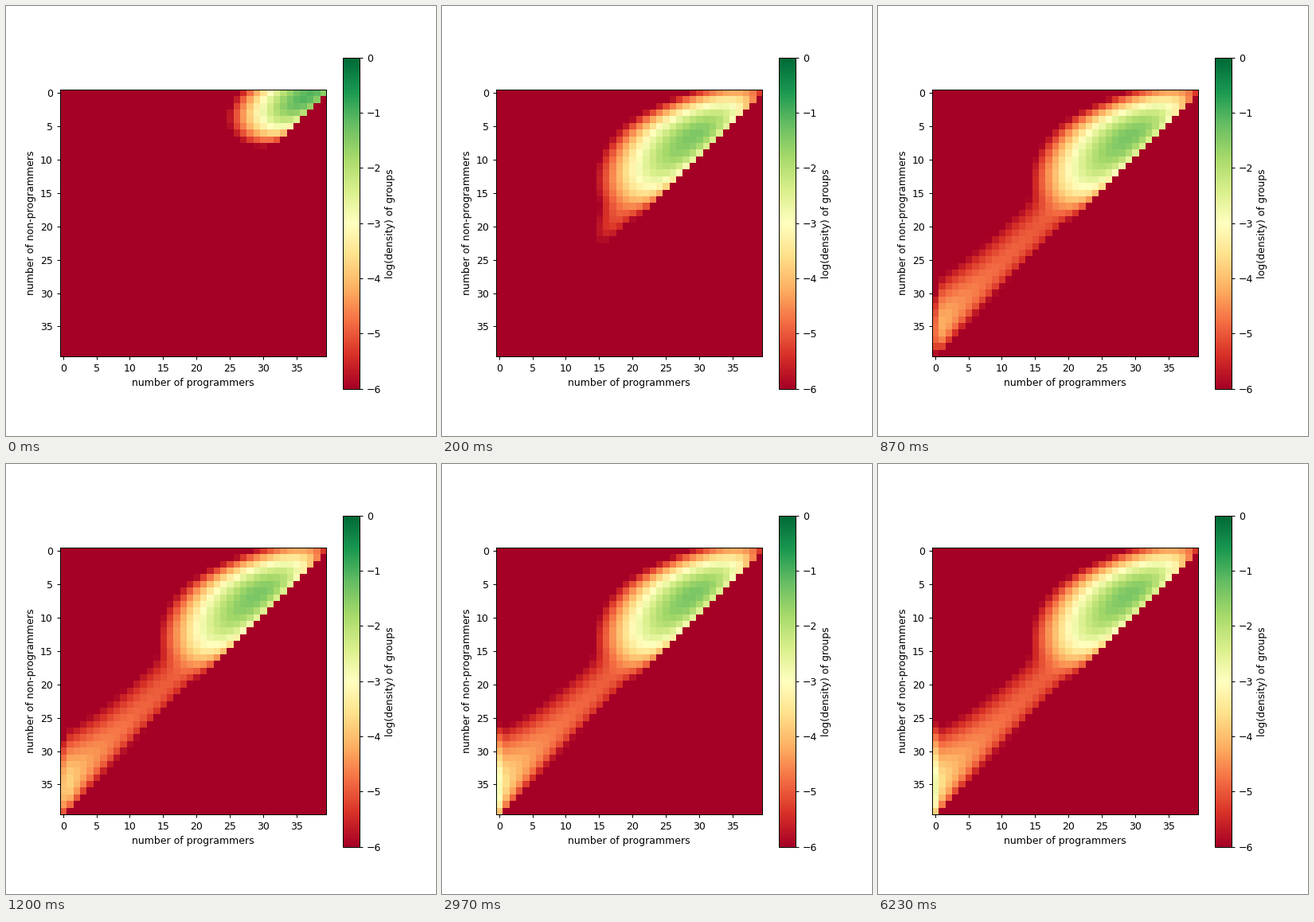
A matplotlib script that plays this animation: 540x540 px, repeating every 8 s.

```python
import numpy as np
import matplotlib.pyplot as plt
from matplotlib.animation import FuncAnimation

SIZE = 40
FRAMES, INTERVAL = 250, 32
STEPS_PER_SECOND = 30

plt.rcParams["font.family"] = "DejaVu Sans"
plt.rcParams["font.size"] = 10

y, x = np.mgrid[:SIZE, :SIZE]
vacancy = SIZE - 1 - x - y
allowed = vacancy >= 0
vacancy = np.clip(vacancy, 0, None)
index = np.arange(SIZE)
LOG_FACT = np.concatenate([[0], np.cumsum(np.log10(index[1:]))])


def poisson_drop(mean):
    """Log10 of a Poisson law of the vacancies, relative to its mode."""
    mode = np.floor(mean).astype(int)
    return (vacancy - mode) * np.log10(mean) - LOG_FACT[vacancy] + LOG_FACT[mode]


def cluster(step):
    """Main cluster: its ridge drifts from the top corner to its rest place."""
    settled = 1 - np.exp(-0.8 * step)
    start_ridge = -1.05 - 0.088 * (index - 0.5) ** 2
    offset = index - 6.5
    rest_ridge = -1.4 - np.where(offset < 0, 0.068, 0.028) * offset ** 2
    start_mean = np.maximum(2.5 - 0.08 * index, 1)
    rest_mean = np.maximum(4.2 - 0.0065 * index ** 2, 1)
    ridge = start_ridge + settled * (rest_ridge - start_ridge)
    mean = start_mean + settled * (rest_mean - start_mean)
    return ridge[:, None] + poisson_drop(mean[:, None])


def tail(step):
    """Stream of groups losing programmers, piling up where none are left."""
    front = 34 * np.exp(-step / 10)
    filled = 1 - np.exp(-(step / 24) ** 2)
    ridge = -5.05 + 1.7 * filled * np.exp(-index / 5.5)
    ridge[0] = -2.72 + np.log10(step ** 4 / (step ** 4 + 70 ** 4) + 1e-9)
    ridge -= 0.05 * np.maximum(front - index, 0) ** 2
    return ridge + poisson_drop(np.float64(4))


def log_density(step):
    total = np.log10(10 ** cluster(step) + 10 ** tail(step) + 1e-12)
    return np.where(allowed, total, -12)


fig, ax = plt.subplots(figsize=(6, 6), dpi=90)
image = ax.imshow(log_density(0), cmap="RdYlGn", vmin=-6, vmax=0,
                  interpolation="nearest")
ax.set_xticks(range(0, SIZE, 5))
ax.set_yticks(range(0, SIZE, 5))
ax.set_xlabel("number of programmers")
ax.set_ylabel("number of non-programmers")
fig.colorbar(image, ax=ax, label="log(density) of groups")


def update(frame):
    step = round(frame * INTERVAL / 1000 * STEPS_PER_SECOND)
    image.set_data(log_density(step))
    return [image]


anim = FuncAnimation(fig, update, frames=FRAMES, interval=INTERVAL,
                     repeat=True, repeat_delay=0)
plt.show()
```
